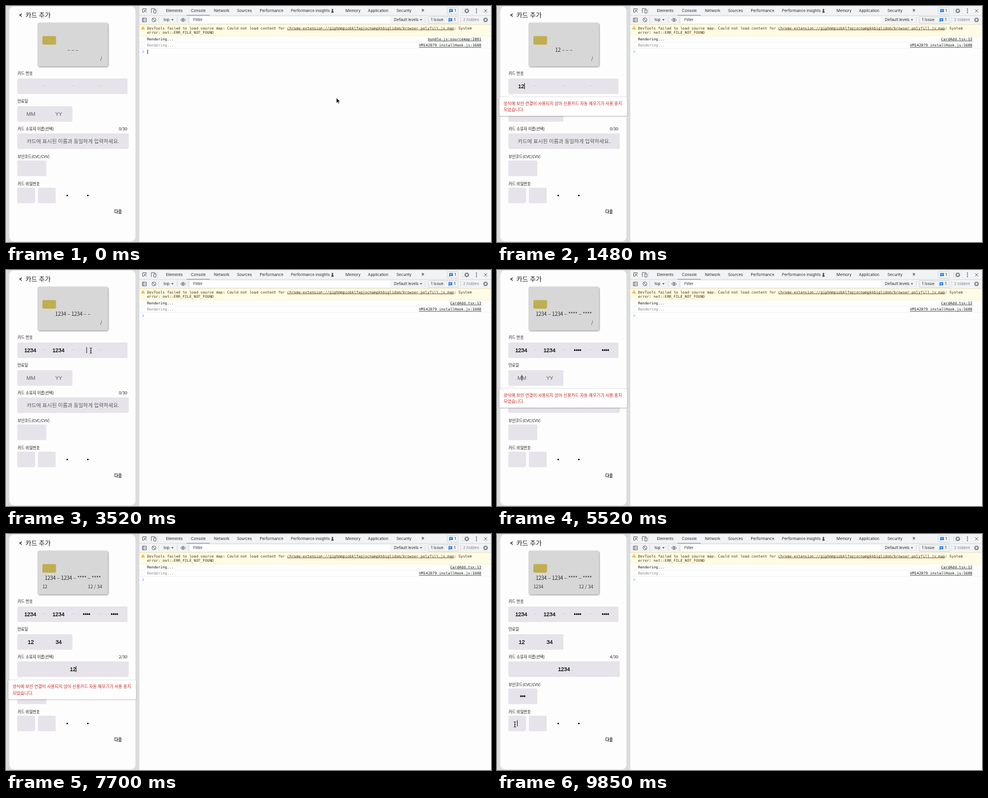
Recreate the animation shown at these times as an HTML page. Size 800x391 px, loop 9880 ms.

```html
<!DOCTYPE html>
<html lang="ko">
<head>
<meta charset="utf-8">
<title>카드 추가</title>
<style>
html, body { margin: 0; width: 100%; height: 100%; overflow: hidden; }
svg { display: block; width: 100%; height: 100%; font: 6.3px "Noto Sans CJK KR", "Noto Sans CJK", sans-serif; }
text { white-space: pre; fill: #1a1a1a; }
.ui text { font: 6.35px Inter, sans-serif; fill: #2c2c2c; }
.ui .muted { fill: #80868b; }
.ui .more { font-size: 9px; }
.mono text { font: 6.1px "DejaVu Sans Mono", monospace; }
.mono .warning { fill: #4f3300; }
.mono .muted { fill: #888; }
.link { text-decoration: underline; text-decoration-thickness: .6px; }
.field { fill: #e6e4ea; }
.input { font: 8.8px "Liberation Sans", Arial, sans-serif; text-anchor: middle; fill: #000; stroke: #000; stroke-width: .25px; }
.input.hint { fill: #5c5c5c; stroke: none; }
.input.long { font: 8.5px "Noto Sans CJK KR", "Noto Sans CJK", sans-serif; }
.card text { fill: #333; font-size: 7.4px; }
.card #number { font-size: 8.8px; letter-spacing: -.36px; word-spacing: .6px; text-anchor: middle; }
.end { text-anchor: end; }
.icon { fill: none; stroke: #5f6368; stroke-width: .9; }
.rule { stroke: #cacdd1; stroke-width: .6; }
#popup text { fill: #c5221f; font-size: 6.92px; font-weight: 500; }
</style>
</head>
<body>
<svg viewBox="0 0 800 391">
  <defs>
    <filter id="shadow" x="-10%" y="-30%" width="120%" height="170%">
      <feDropShadow dx="1" dy="1.2" stdDeviation="1.2" flood-opacity=".4"/>
    </filter>
    <filter id="glow" x="-10%" y="-30%" width="120%" height="170%">
      <feDropShadow dx="0" dy=".5" stdDeviation=".9" flood-opacity=".4"/>
    </filter>
    <g id="gear" class="icon">
      <circle r="2.5" stroke-width="1.2"/><circle r="3.7" stroke-dasharray="1.45 1.45"/>
    </g>
    <g id="chat">
      <path d="M0 0h6v5h-4.5L0 6.5z" fill="#1a73e8"/>
      <path d="M1.2 1.6h3.6M1.2 3.2h2.6" stroke="#fff" stroke-width=".7"/>
    </g>
  </defs>

  <rect width="800" height="391" fill="#dcdcdc"/>
  <rect x="5.5" y=".5" width="208" height="389.5" rx="8" fill="#fdfdfd"/>
  <path d="M26 13l-3.4 2.1 3.4 2.1" fill="none" stroke="#111" stroke-width="1.1"/>
  <text x="32" y="18.5" font-size="10.5" font-weight="500">카드 추가</text>

  <g class="card">
    <rect x="52" y="27.5" width="116" height="72.5" rx="3" fill="#d7d7d7" filter="url(#shadow)"/>
    <rect x="60" y="49.7" width="22.5" height="14.3" rx="2" fill="#c0ae50"/>
    <text id="number" x="110" y="75.7"></text>
    <text id="owner" x="60" y="90.3"></text>
    <text id="expiry" class="end" x="158.5" y="90.3"></text>
  </g>

  <text x="19" y="114">카드 번호</text>
  <text x="19" y="160">만료일</text>
  <text x="19" y="206">카드 소유자 이름(선택)</text>
  <text id="count" class="end" x="200" y="206" font-size="6.7"></text>
  <text x="19" y="251.5">보안코드(CVC/CVV)</text>
  <text x="19" y="296.5">카드 비밀번호</text>
  <g id="boxes"></g>
  <path d="M62 132.3h2M108.5 132.3h2M155 132.3h2" stroke="#bbb8c2" stroke-width=".7"/>
  <circle cx="101" cy="314" r="1.3"/><circle cx="135" cy="314" r="1.3"/>
  <text x="178.8" y="342.8" font-size="6.7" font-weight="700">다음</text>
  <g id="inputs"></g>

  <g class="ui">
    <rect x="219" width="581" height="391" fill="#fdfdfd"/>
    <rect x="219" width="581" height="30.5" fill="#f1f3f4"/>
    <path class="rule" d="M219.5 0V391M219 15.7H800M219 30.5H800M249.5 3V13M753.5 3V13M252 18V28M282.5 18V28M301 18V28M691.5 18V28M750 18V28"/>
    <rect x="304" y="17.8" width="330" height="10.5" fill="#fff"/>
    <path class="icon" d="M231.5 6V4.5H225.5V10.5H227.5M228.5 7L232 10.8M228.5 7V10M228.5 7H231.5
      M239.8 11.5V4.3H245.8V6M243.8 6.5H247.3V11.7H243.8z
      M225 20H231.5V26.2H225zM226.7 20V26.2M228.6 21.8L230 23.1L228.6 24.4"/>
    <circle class="icon" cx="244" cy="23" r="3.2"/><path class="icon" d="M241.8 20.8l4.4 4.4"/>
    <path class="icon" d="M288 23q4-5.5 8 0q-4 5.5-8 0z"/><circle cx="292" cy="23" r="1.5" fill="#5f6368"/>
    <path d="M537 5h3v.8h-.6v2l1.3 3.2h-4.4l1.3-3.2v-2H537z" fill="#444"/>
    <rect x="298" y="14.8" width="38" height="1" fill="#6d8cc4"/>
    <g id="labels"></g>
    <path d="M272.5 21.8h4l-2 2.6zM682.5 21.8h4l-2 2.6z" fill="#5f6368"/>
    <g fill="none" stroke="#cacdd1" stroke-width=".7">
      <rect x="727.5" y="2.5" width="18.5" height="11" rx="1.5"/>
      <rect x="696.5" y="17.7" width="49.5" height="11" rx="1.5"/>
    </g>
    <use href="#chat" x="731" y="5"/><use href="#chat" x="730" y="20.3"/>
    <use href="#gear" x="760" y="8"/><use href="#gear" x="791" y="23"/>
    <g fill="#5f6368"><circle cx="776" cy="5" r=".9"/><circle cx="776" cy="8" r=".9"/><circle cx="776" cy="11" r=".9"/></g>
    <path class="icon" d="M788.5 5.3l5.2 5.2m0-5.2l-5.2 5.2"/>
  </g>

  <g class="mono">
    <rect x="220" y="31" width="580" height="18.5" fill="#fffbe5"/>
    <path d="M220 31H800M220 49.5H800" stroke="#fff0b3" stroke-width=".7"/>
    <path d="M220 60H800M220 70.5H800" stroke="#f0f0f0" stroke-width=".7"/>
    <path d="M226 33l3.2 5.8h-6.4z" fill="#f2ab26"/><path d="M226 35v2M226 37.5v.7" stroke="#fff" stroke-width=".7"/>
    <text class="warning" x="232.7" y="38.5">DevTools failed to load source map: Could not load content for <tspan class="link">chrome-extension://gighmmpiobklfepjocnamgkkbiglidom/browser-polyfill.js.map</tspan>: System</text>
    <text class="warning" x="232.7" y="45.7">error: net::ERR_FILE_NOT_FOUND</text>
    <text x="232.7" y="56.7">Rendering...</text>
    <text class="muted" x="232.7" y="67.2">Rendering...</text>
    <text id="source" class="link end" x="784" y="56.7"></text>
    <text class="link end" x="784" y="67.2">VM142079 installHook.js:1608</text>
    <path d="M225 73.5l2.4 2.2-2.4 2.2" fill="none" stroke="#5b8def" stroke-width=".8"/>
  </g>

  <g id="popup">
    <path id="bubble" fill="#fff" filter="url(#glow)"/>
    <text x="11" y="12.6">양식에 보안 연결이 사용되지 않아 신용카드 자동 채우기가 사용 중지</text>
    <text x="11" y="23.4">되었습니다.</text>
  </g>
  <rect id="caret" width=".8"/>
  <g id="mouse">
    <path id="arrow" d="M0 0v8.6l2-1.8 1.4 3 1.4-.6-1.4-3h2.8z" stroke="#fff" stroke-width=".6"/>
    <path id="beam" d="M-1.8-4q1.8 0 1.8 1.2v6.6q0 1.2-1.8 1.2M1.8-4q-1.8 0-1.8 1.2M1.8 5q-1.8 0-1.8-1.2M-1 .8h2" fill="none" stroke="#111" stroke-width=".9"/>
  </g>
</svg>
<script>
const LOOP = 9880;
const $ = id => document.getElementById(id);
const add = (parent, tag, attrs, content = '') => {
  const el = document.createElementNS('http://www.w3.org/2000/svg', tag);
  for (const key in attrs) el.setAttribute(key, attrs[key]);
  el.textContent = content;
  return parent.appendChild(el);
};
const addLabels = (y, labels) => labels.forEach(([x, label, style = '']) =>
  add($('labels'), 'text', {x, y, class: style}, label));

addLabels(10.3, [[264, 'Elements'], [305, 'Console'], [343, 'Network'], [381, 'Sources'], [418.5, 'Performance'],
  [470, 'Performance insights'], [560, 'Memory'], [597, 'Application'], [644, 'Security'], [685, '»', 'more'], [739.5, '1']]);
addLabels(25.3, [[260, 'top'], [309, 'Filter'], [640, 'Default levels'], [701, '1 Issue:'], [739, '1'], [754, '2 hidden', 'muted']]);

const boxes = [[18.6, 120, 181.8], [18.6, 166, 91], [18.6, 211, 184], [18.6, 256, 48], [18.6, 301, 29.4], [52.6, 301, 29.4]];
for (const [x, y, width] of boxes) add($('boxes'), 'rect', {class: 'field', x, y, width, height: 25.8, rx: 2});

// Each field: centre, focus time, key press times
const fields = [
  {x: 40, y: 133, focus: 1040, keys: [1330, 1460, 1620, 1780]},
  {x: 86.5, y: 133, focus: 2310, keys: [2430, 2580, 2730, 2880]},
  {x: 133, y: 133, focus: 3400, keys: [3620, 3770, 3920, 4070], mask: true},
  {x: 179, y: 133, focus: 4250, keys: [4640, 4820, 4970, 5120], mask: true},
  {x: 41, y: 179, focus: 5300, keys: [5700, 5860], hint: 'MM'},
  {x: 87, y: 179, focus: 6260, keys: [6750, 6950], hint: 'YY', value: '34'},
  {x: 110.5, y: 224, focus: 7250, keys: [7480, 7640, 7800, 7960], hint: '카드에 표시된 이름과 동일하게 입력하세요.', long: true},
  {x: 42.5, y: 269, focus: 8800, keys: [9000, 9150, 9300], mask: true},
  {x: 33.5, y: 314, focus: 9770, keys: [], mask: true},
];
for (const f of fields) f.el = add($('inputs'), 'text', {x: f.x, y: f.y + 2.8});

// Start, end, top, arrow x
const popups = [[1070, 2290, 151, 23], [2340, 2990, 151, 69], [5330, 6260, 197, 23], [6290, 7250, 197, 69], [7280, 8500, 242.5, 23]];

// Shown, hidden, move start, move end, from, to
const moves = [
  [0, 1330, 150, 950, 545, 152.3, 40, 133],
  [2080, 2430, 2100, 2300, 40, 133, 88, 133],
  [3010, 3620, 3030, 3380, 88, 133, 140, 133],
  [8300, 9000, 8320, 8700, 140, 133, 40, 267],
  [9400, LOOP, 9430, 9750, 40, 267, 29.5, 315],
];

const show = (el, on) => el.style.display = on ? '' : 'none';
const current = (list, t) => list.find(([start, end]) => t >= start && t < end);

function drawForm(t) {
  const values = fields.map(f => {
    const count = f.keys.filter(k => k <= t).length;
    const plain = (f.value || '1234').slice(0, count);
    f.el.textContent = (f.mask ? '•'.repeat(count) : plain) || f.hint || '';
    f.el.setAttribute('class', 'input' + (count || !f.hint ? '' : f.long ? ' hint long' : ' hint'));
    return f.mask ? '*'.repeat(count) : plain;
  });
  $('number').textContent = values.slice(0, 4).join(' – ').replace(/ +/g, ' ').trim();
  $('expiry').textContent = `${values[4]} / ${values[5]}`.trim();
  $('owner').textContent = values[6];
  $('count').textContent = values[6].length + '/30';
  $('source').textContent = t < 300 ? 'bundle.js:sourcemap:2801' : 'CardAdd.tsx:13';

  const active = fields.filter(f => f.focus <= t).pop();
  let x = 233.3, y = 75.8, since = 0;
  if (active) {
    const typed = active.keys.filter(k => k <= t);
    since = typed.length ? typed[typed.length - 1] : active.focus;
    x = active.x + (typed.length ? active.el.getComputedTextLength() / 2 : -.4);
    y = active.y - .3;
  }
  const height = active ? 10 : 7;
  const caret = $('caret');
  caret.setAttribute('x', x);
  caret.setAttribute('y', y - height / 2);
  caret.setAttribute('height', height);
  show(caret, (t - since) % 1000 < 500);
}

function drawPopup(t) {
  const popup = current(popups, t);
  show($('popup'), popup);
  if (!popup) return;
  const [, , top, tip] = popup;
  $('popup').setAttribute('transform', `translate(0 ${top})`);
  $('bubble').setAttribute('d', `M6 0H${tip - 4}l4-4 4 4H212.5q2 0 2 2V29q0 2-2 2H6q-2 0-2-2V2q0-2 2-2z`);
}

function drawMouse(t) {
  const move = current(moves, t);
  show($('mouse'), move);
  if (!move) return;
  const [, , start, end, x0, y0, x1, y1] = move;
  const p = Math.min(1, Math.max(0, (t - start) / (end - start)));
  const ease = p * p * (3 - 2 * p);
  const x = x0 + (x1 - x0) * ease, y = y0 + (y1 - y0) * ease;
  const overField = boxes.some(([bx, by, w]) => x > bx && x < bx + w && y > by && y < by + 26);
  show($('arrow'), !overField);
  show($('beam'), overField);
  $('mouse').setAttribute('transform', `translate(${x} ${y})`);
}

function frame() {
  const t = performance.now() % LOOP;
  drawForm(t);
  drawPopup(t);
  drawMouse(t);
  requestAnimationFrame(frame);
}
frame();
</script>
</body>
</html>
```
